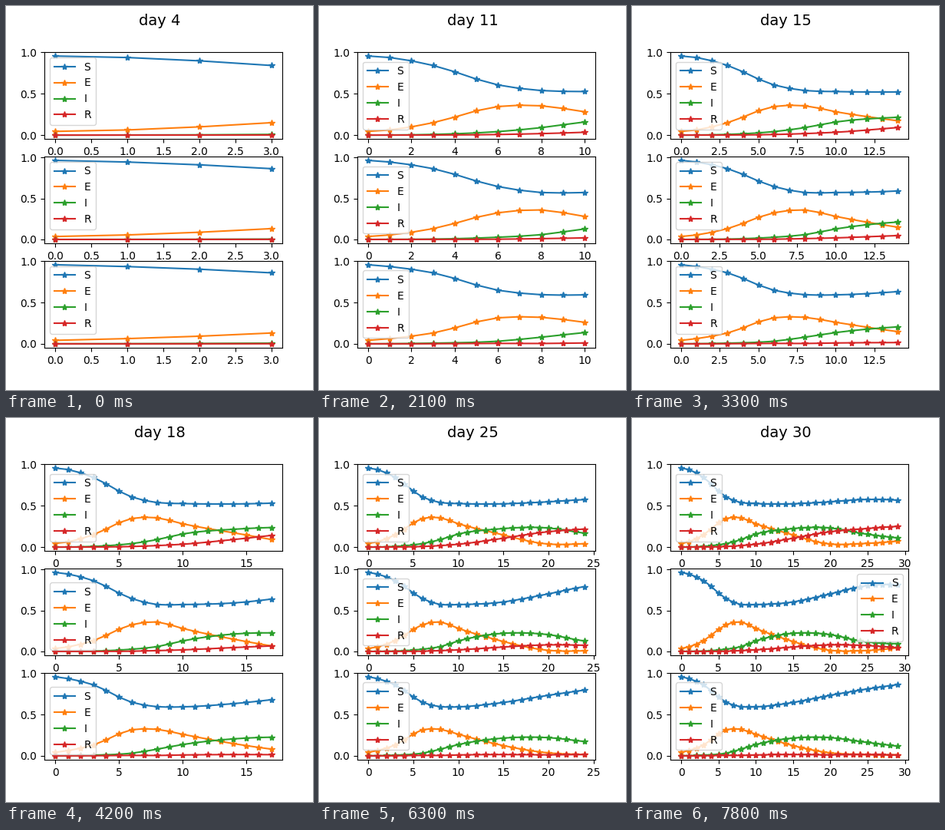
A matplotlib script that plays this animation: 400x500 px, repeating every 8000 ms.

```python
import matplotlib.pyplot as plt
import numpy as np
from matplotlib.animation import FuncAnimation

FIRST_DAY, LAST_DAY = 4, 30
TICK_MS, TICKS_PER_DAY, LOOP_MS = 100, 3, 8000
DAYS = np.arange(LAST_DAY)
KEY_DAYS = np.array([0, 1, 3, 6, 8, 10, 14, 20, 24, 29])


def smooth(values):
    """Daily values of a cubic Hermite curve through the key days."""
    y = np.array(values)
    slope = np.gradient(y, KEY_DAYS, edge_order=2)
    k = np.searchsorted(KEY_DAYS[1:-1], DAYS, side="right")
    width = np.diff(KEY_DAYS)[k]
    t = (DAYS - KEY_DAYS[k]) / width
    ease = t * t * (3 - 2 * t)
    bend = t * (1 - t) * (slope[k] * (1 - t) - slope[k + 1] * t)
    return y[k] + (y[k + 1] - y[k]) * ease + width * bend


def seir(exposed, infected, recovered):
    """Shares of each group; whoever is left is still susceptible."""
    e, i, r = map(smooth, (exposed, infected, recovered))
    return {"S": 1 - e - i - r, "E": e, "I": i, "R": r}


regions = [
    seir([.045, .062, .15, .345, .354, .282, .173, .036, .041, .072],
         [0, .001, .008, .042, .09, .158, .215, .231, .168, .111],
         [0, 0, .001, .007, .018, .034, .091, .186, .218, .25]),
    seir([.036, .055, .132, .325, .36, .281, .15, .013, .008, .045],
         [0, .001, .004, .027, .058, .128, .212, .205, .127, .095],
         [0, 0, .001, .003, .01, .019, .047, .08, .075, .045]),
    seir([.042, .063, .131, .315, .321, .261, .148, .035, .016, .011],
         [0, .001, .008, .031, .08, .136, .205, .22, .173, .117],
         [0, 0, .001, .005, .004, .01, .015, .012, .015, .01]),
]

fig, axes = plt.subplots(3, 1, figsize=(4, 5), dpi=100)
title = fig.suptitle("", fontsize=14)

panels = []
for ax, groups in zip(axes, regions):
    lines = [(ax.plot([], [], "-*", label=name)[0], values)
             for name, values in groups.items()]
    ax.legend(loc="best")
    panels.append((ax, lines))


def update(tick):
    day = min(FIRST_DAY + tick // TICKS_PER_DAY, LAST_DAY)
    title.set_text(f"day {day}")
    for ax, lines in panels:
        for line, values in lines:
            line.set_data(DAYS[:day], values[:day])
        ax.relim()
        ax.autoscale_view()


anim = FuncAnimation(fig, update, frames=LOOP_MS // TICK_MS,
                     interval=TICK_MS, repeat=True, repeat_delay=0)
plt.show()
```
